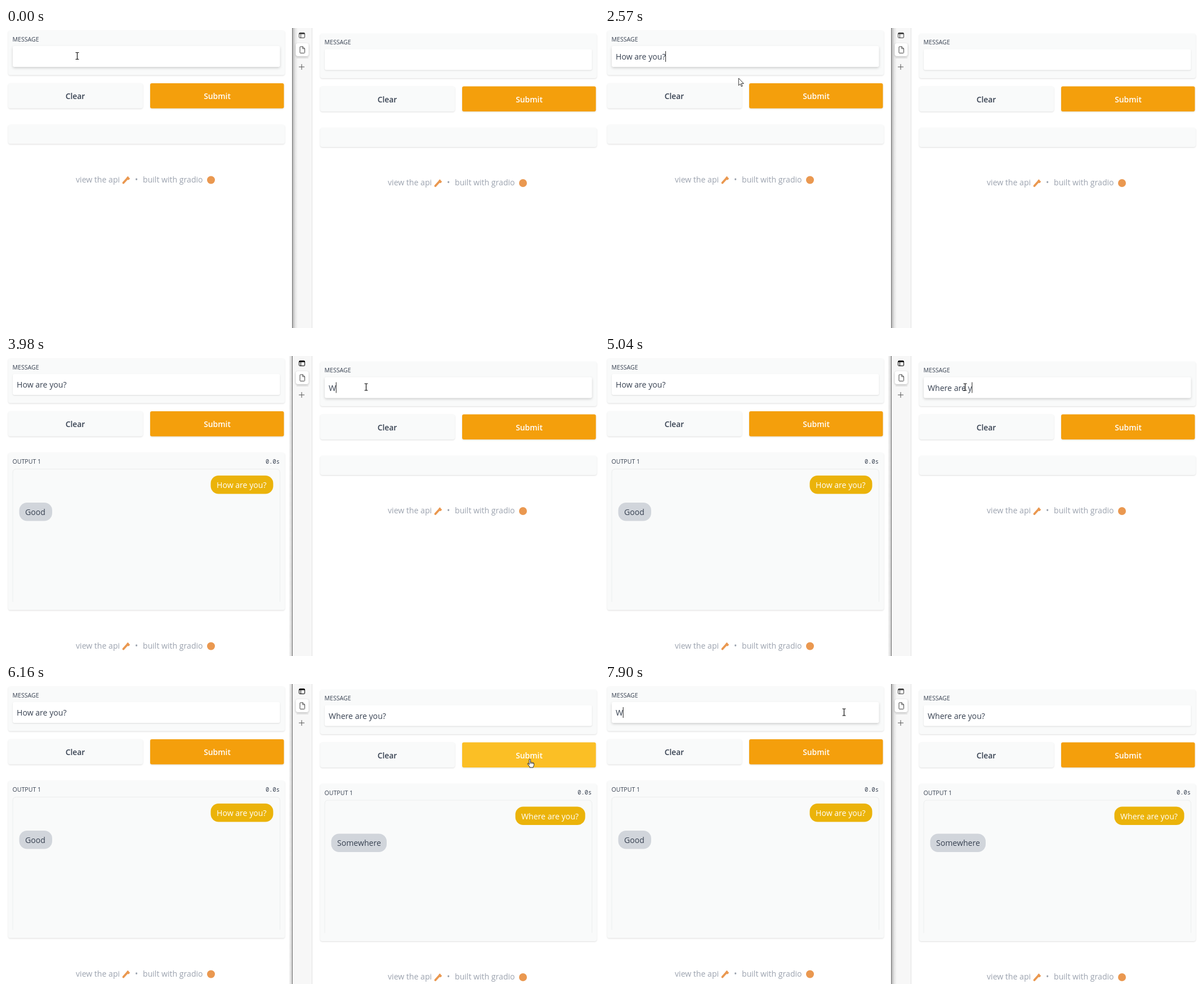
These frames come from a looping animation (1053 px wide and 532 px high, 8 s). An HTML page:

```html
<!DOCTYPE html>
<html lang="en">
<head>
<meta charset="utf-8">
<title>Two chat windows</title>
<style>
  html, body { margin: 0; width: 100%; height: 100%; overflow: hidden; background: #fff; }
  svg { display: block; }
  text { font: 14.1px "Open Sans", "Noto Sans", sans-serif; fill: #374151; white-space: pre; }
  .label { font-size: 10.6px; }
  .timer { font: 10.4px "Noto Sans Mono", monospace; }
  .btn { font-weight: 600; font-size: 13.9px; text-anchor: middle; }
  .foot text { fill: #9ca3af; }
  .light { fill: #fff; }
  .card { fill: #f9fafa; filter: drop-shadow(0 1px 1px rgba(0,0,0,.13)); }
  .submit { fill: #f49f0c; filter: drop-shadow(0 1px 1px rgba(0,0,0,.13)); }
  .submit.hover { fill: #fbbf25; }
  .field { fill: #fff; filter: drop-shadow(0 1px 1px rgba(0,0,0,.12)); }
  .field.focus { filter: drop-shadow(0 2px 2px rgba(0,0,0,.17)); }
</style>
</head>
<body>
<svg id="stage" width="1053" height="532" viewBox="0 0 1053 532">
  <defs>
    <linearGradient id="shadeRight">
      <stop offset="0" stop-opacity=".27"/><stop offset=".5" stop-opacity=".08"/><stop offset="1" stop-opacity="0"/>
    </linearGradient>
    <linearGradient id="shadeLeft">
      <stop offset="0" stop-opacity="0"/><stop offset="1" stop-opacity=".2"/>
    </linearGradient>
  </defs>
  <g id="panes"></g>
  <g id="sidebar">
    <rect x="509" width="35" height="532" fill="#f7f7f7"/>
    <rect x="543" width="1" height="532" fill="#e2e2e2"/>
    <rect id="castRight" x="509" width="9" height="532" fill="url(#shadeRight)"/>
    <rect id="castLeft" x="502" width="6" height="532" fill="url(#shadeLeft)"/>
    <rect x="508" width="1" height="532" fill="#707070"/>
    <g id="tabIcon" fill="none" stroke="#444">
      <rect x="520.5" y="8.5" width="10" height="9" rx="1.5"/>
      <path d="M521 10h9" stroke-width="2"/><path d="M523.5 10v7"/>
    </g>
    <rect x="516" y="52.5" width="21" height="1" fill="#d6d6d6"/>
    <rect x="514.5" y="27" width="23" height="23" rx="4" fill="#fff" style="filter:drop-shadow(0 1px 1.5px rgba(0,0,0,.28))"/>
    <path d="M523 33h4l3.500 3.500v7q0 1-1 1h-6.500q-1 0-1-1v-9.500q0-1 1-1zM526.800 33v3.700h3.700" fill="none" stroke="#444"/>
    <path d="M520 69h10M525 64v10" stroke="#555" fill="none"/>
  </g>
  <g id="cursor">
    <path data-kind="beam" d="M-3-6h2.200l.8.700.8-.700H3M-3 6h2.200l.8-.700.8.700H3M0-5.500v11" fill="none" stroke="#111" stroke-width="1.200"/>
    <path data-kind="hand" d="M-3 2.500V-5.800q0-1.300 1.200-1.300t1.200 1.300v4.300q1.200-.9 2.100.3 1.300-.7 2.100.5 1.900-.4 1.900 1.400v2.300q0 1.800-1.300 3.200V7.500H-2.200V6L-5.600 1.600q-.7-1.400.6-1.700.9-.1 2 1.600zM-.6-1.500V1M1.500-1.200V1M3.600-.7V1.200" fill="#fff" stroke="#222" stroke-width="1" stroke-linejoin="round"/>
    <path data-kind="arrow" d="M0-5v13l3-2.800 2 4.600 1.800-.8-2-4.500h4.200z" fill="#fff" stroke="#222" stroke-width=".9"/>
  </g>
</svg>
<script>
const LOOP = 8000;
const $ = id => document.getElementById(id);
const show = (el, on) => el.setAttribute('visibility', on ? 'inherit' : 'hidden');

const rect = (cls, x, y, w, h, r = 4) =>
  `<rect class="${cls}" x="${x}" y="${y}" width="${w}" height="${h}" rx="${r}"/>`;
const text = (cls, x, y, s) => `<text class="${cls}" x="${x}" y="${y}">${s}</text>`;

function paneMarkup({ question, answer, askWidth, replyWidth }) {
  return rect('card', 4, 4.5, 491, 79) + text('label', 11.5, 23.5, 'MESSAGE')
    + rect('field', 12, 32, 474.5, 37, 3)
    + '<rect class="selection" x="19" y="40" height="22" fill="#0078d7"/>'
    + text('typed', 19, 56, '')
    + '<rect class="caret" y="41" width="1" height="19" fill="#222"/>'
    + rect('card', 4, 98, 239, 44.5) + text('btn', 123, 126.3, 'Clear')
    + rect('submit', 256, 98, 237.5, 44.5, 3) + text('btn light', 375, 126.3, 'Submit')
    + rect('card output', 4, 171.5, 491, 34)
    + '<g class="chat">'
    + text('label', 11.5, 191, 'OUTPUT 1') + text('timer', 461, 190.5, '0.0s')
    + '<path d="M12 436V207q0-6.500 6.500-6.500H480q6.500 0 6.500 6.500V436" fill="none" stroke="#eceeee"/>'
    + `<rect x="${474.5 - askWidth}" y="212" width="${askWidth}" height="32.500" rx="14" fill="#ebb30a"/>`
    + text('light', 485 - askWidth, 234, question)
    + `<rect x="23.500" y="260" width="${replyWidth}" height="32.500" rx="14" fill="#d1d5db"/>`
    + text('', 34, 281.5, answer)
    + '</g><g class="foot">'
    + text('', 124, 273.5, 'view the api') + text('', 229, 273.5, '•') + text('', 243, 273.5, 'built with gradio')
    + '<path d="M208.500 274.500l6.300-7" stroke="#ea9850" stroke-width="3.800" stroke-linecap="round"/>'
    + '<path d="M217.300 263.800l-2 2.200.3 1.800 1.900.2 1.600-2.100" fill="none" stroke="#ea9850" stroke-width="2.800"/>'
    + '<circle cx="364" cy="269.500" r="7" fill="#ea9850"/></g>';
}

// Each key: [time, characters typed]
const panes = [
  {
    x: 0, y: 0, question: 'How are you?', answer: 'Good', askWidth: 111, replyWidth: 58.5, sent: 2890,
    keys: [[510, 'H'], [940, 'o'], [1170, 'w'], [1330, ' '], [1410, 'a'], [1500, 're'], [1580, ' '],
           [1740, 'y'], [1820, 'o'], [1900, 'u'], [2150, '?']],
    focused: t => t < 2890 || t >= 7340,
    caret: t => t >= 60,
    select: 7560, retype: [7900, 'W']
  },
  {
    x: 554, y: 5.5, question: 'Where are you?', answer: 'Somewhere', askWidth: 124, replyWidth: 98.5, sent: 6160,
    keys: [[3980, 'W'], [4210, 'h'], [4290, 'e'], [4380, 'r'], [4460, 'e'], [4610, ' '], [4690, 'a'],
           [4780, 're'], [4860, ' '], [5040, 'y'], [5120, 'o'], [5190, 'u'], [5360, '?']],
    focused: t => t >= 3740 && t < 6160,
    caret: () => true,
    select: Infinity, retype: [Infinity, '']
  }
];

for (const pane of panes) {
  const g = document.createElementNS('http://www.w3.org/2000/svg', 'g');
  g.setAttribute('transform', `translate(${pane.x} ${pane.y})`);
  g.innerHTML = paneMarkup(pane);
  $('panes').append(g);
  pane.el = {};
  for (const name of ['field', 'selection', 'typed', 'caret', 'submit', 'output', 'chat', 'foot'])
    pane.el[name] = g.querySelector('.' + name);
}

// Pointer moves: first step, last step, number of steps, destination
const moves = [
  [60, 60, 1, 125.5, 47],
  [2410, 2720, 5, 298, 119.5],
  [2960, 3030, 2, 322, 88],
  [3270, 3740, 7, 639.5, 55],
  [5790, 6010, 4, 932, 140.5],
  [6240, 6930, 10, 478, 50],
  [7030, 7340, 4, 424.5, 50]
];

function pointerAt(t) {
  let x = 126.5, y = 49.5;
  for (const [start, end, steps, toX, toY] of moves) {
    if (t < start) break;
    const gap = (end - start) / (steps - 1 || 1) || 1;
    const p = Math.min(steps, Math.floor((t - start) / gap + 1e-6) + 1) / steps;
    const e = p * p * (3 - 2 * p);
    x += (toX - x) * e;
    y += (toY - y) * e;
  }
  return { x, y };
}

const inside = (pane, p, x0, y0, x1, y1) => {
  const x = p.x - pane.x, y = p.y - pane.y;
  return x >= x0 && x <= x1 && y >= y0 && y <= y1;
};
const overField = (pane, p) => inside(pane, p, 12, 32, 486, 69);
const overSubmit = (pane, p) => inside(pane, p, 256, 98, 494, 142);
const overClear = (pane, p) => inside(pane, p, 4, 98, 243, 142);

function drawPane(pane, t, pointer) {
  const { el } = pane;
  const retyped = t >= pane.retype[0];
  const value = retyped ? pane.retype[1]
    : pane.keys.filter(k => k[0] <= t).map(k => k[1]).join('');
  if (el.typed.textContent !== value) el.typed.textContent = value;
  const width = value ? el.typed.getComputedTextLength() : 0;

  const selected = t >= pane.select && !retyped;
  show(el.selection, selected);
  el.selection.setAttribute('width', width);
  el.typed.classList.toggle('light', selected);

  const focused = pane.focused(t);
  el.field.classList.toggle('focus', focused);
  show(el.caret, focused && pane.caret(t) && !selected);
  el.caret.setAttribute('x', 18.7 + width);

  el.submit.classList.toggle('hover', overSubmit(pane, pointer));
  const sent = t >= pane.sent;
  el.output.setAttribute('height', sent ? 279 : 34);
  show(el.chat, sent);
  el.foot.setAttribute('transform', `translate(0 ${sent ? 245 : 0})`);
}

function draw(t) {
  const pointer = pointerAt(t);
  panes.forEach(pane => drawPane(pane, t, pointer));

  const leftActive = t < 3740 || t >= 7340;
  show($('castRight'), leftActive);
  show($('castLeft'), !leftActive);
  $('tabIcon').setAttribute('stroke', leftActive ? '#444' : '#000');

  const kind = panes.some(p => overField(p, pointer)) ? 'beam'
    : panes.some(p => overSubmit(p, pointer) || overClear(p, pointer)) ? 'hand' : 'arrow';
  $('cursor').setAttribute('transform', `translate(${pointer.x} ${pointer.y})`);
  for (const shape of $('cursor').children) show(shape, shape.dataset.kind === kind);
}

const began = performance.now();
function tick() {
  draw((performance.now() - began) % LOOP);
  requestAnimationFrame(tick);
}
tick();
</script>
</body>
</html>
```
